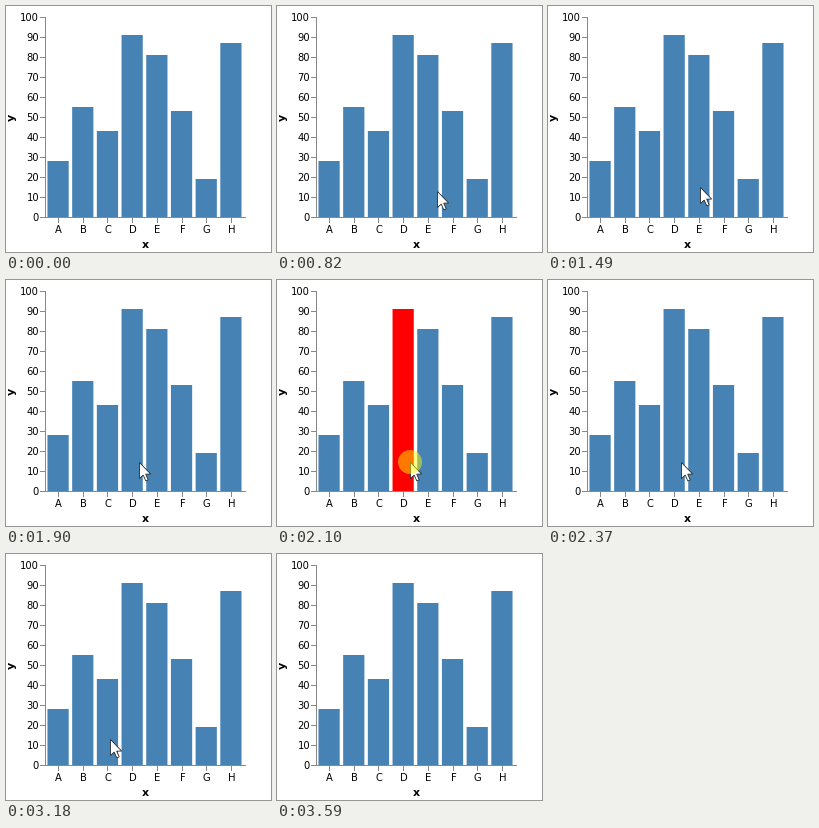
Animation, 265 px wide and 246 px high, one loop 4.32 s. Source, as a matplotlib script:

```python
import matplotlib.pyplot as plt
from matplotlib.animation import FuncAnimation
from matplotlib.patches import Circle, Polygon, Rectangle

W, H = 265, 246
LOOP, STEP = 4320, 20
PX = 0.72  # points per pixel at 100 dpi

LEFT, BASE, SIZE = 39, 211, 200
VALUES = dict(A=28, B=55, C=43, D=91, E=81, F=53, G=19, H=87)
BLUE, RED, GREY = "steelblue", "red", "#888888"
ARROW = [(0, 0), (0, 16), (3.7, 12.6), (6.3, 18.4), (8.7, 17.4),
         (6.2, 11.6), (11.2, 11.6)]

TICK = 70   # the pointer advances once per tick
HALO = 270  # the halo shows this long before each release


def ease_out(u):
    return 1 - (1 - u) ** 3


def ease_both(u):
    return u * u * (3 - 2 * u)


def ease_in(u):
    return u * u


# Pointer stops, from outside the stage to outside again.
ENTRY, ON_E, ON_D, ON_C, EXIT = (
    (286, 259), (152.5, 181), (133, 182), (104, 185), (140, 270))
# Start time, number of ticks, from, to, easing.
MOVES = [
    (460, 8, ENTRY, ON_E, ease_out),
    (1620, 4, ON_E, ON_D, ease_both),
    (2370, 5, ON_D, ON_C, ease_both),
    (3370, 3, ON_C, EXIT, ease_in),
]
# Bar, press time, release time.
CLICKS = [("E", 1220, 1490), ("D", 2100, 2370), ("C", 2850, 3180)]

plt.rcParams["font.family"] = "DejaVu Sans"
fig = plt.figure(figsize=(W / 100, H / 100), dpi=100, facecolor="white")
ax = fig.add_axes([0, 0, 1, 1])
ax.set(xlim=(0, W), ylim=(H, 0))
ax.axis("off")


def line(x0, y0, x1, y1):
    ax.plot([x0, x1], [y0, y1], color=GREY, lw=PX, solid_capstyle="butt",
            snap=False, zorder=1)


def label(x, y, text, size=10, **kw):
    style = dict(ha="center", va="baseline", color="black")
    ax.text(x, y, text, fontsize=size * PX, **{**style, **kw})


def build_chart():
    pad = 0.1
    step = SIZE / (len(VALUES) + pad)
    band = step * (1 - pad)
    bars = {}
    for i, (name, value) in enumerate(VALUES.items()):
        x = LEFT + step * (pad + i)
        bars[name] = ax.add_patch(
            Rectangle((x, BASE - 2 * value), band - 1, 2 * value, fc=BLUE,
                      lw=0, snap=False, zorder=2))
        mid = int(x + band / 2) + 0.5
        line(mid, BASE, mid, BASE + 6)
        label(mid, 227, name)
    for v in range(0, 101, 10):
        y = BASE - 2 * v + 0.5
        line(LEFT - 5, y, LEFT, y)
        label(33, y + 3.5, str(v), ha="right")
    line(LEFT + 0.5, BASE - SIZE, LEFT + 0.5, BASE + 1)
    line(LEFT, BASE + 0.5, LEFT + SIZE + 1, BASE + 0.5)
    label(139.5, 242, "x", 11, weight="bold")
    label(5.5, 111.5, "y", 11, weight="bold", rotation=90, va="center")
    return bars


bars = build_chart()
arrow = ax.add_patch(Polygon(ARROW, fc="white", ec="#222222", lw=0.8 * PX, zorder=4))
halo = ax.add_patch(Circle((0, 0), 12, fc="yellow", lw=0, alpha=0.48, zorder=5))


def pointer(t):
    pos = ENTRY
    for start, ticks, a, b, ease in MOVES:
        if t >= start:
            u = ease(min((t - start) // TICK / ticks, 1))
            pos = [round(p + (q - p) * u) for p, q in zip(a, b)]
    return pos


def update(i):
    t = i * STEP + STEP / 2
    px, py = pointer(t)
    arrow.set_xy([(px + x + 0.5, py + y + 0.5) for x, y in ARROW])
    halo.center = px, py
    halo.set_visible(False)
    for name, press, release in CLICKS:
        pressed = press <= t < release
        bars[name].set_facecolor(RED if pressed else BLUE)
        if pressed and t >= release - HALO:
            halo.set_visible(True)
    return [*bars.values(), arrow, halo]


anim = FuncAnimation(fig, update, frames=LOOP // STEP, interval=STEP,
                     repeat=True, repeat_delay=0, blit=False)
plt.show()
```
